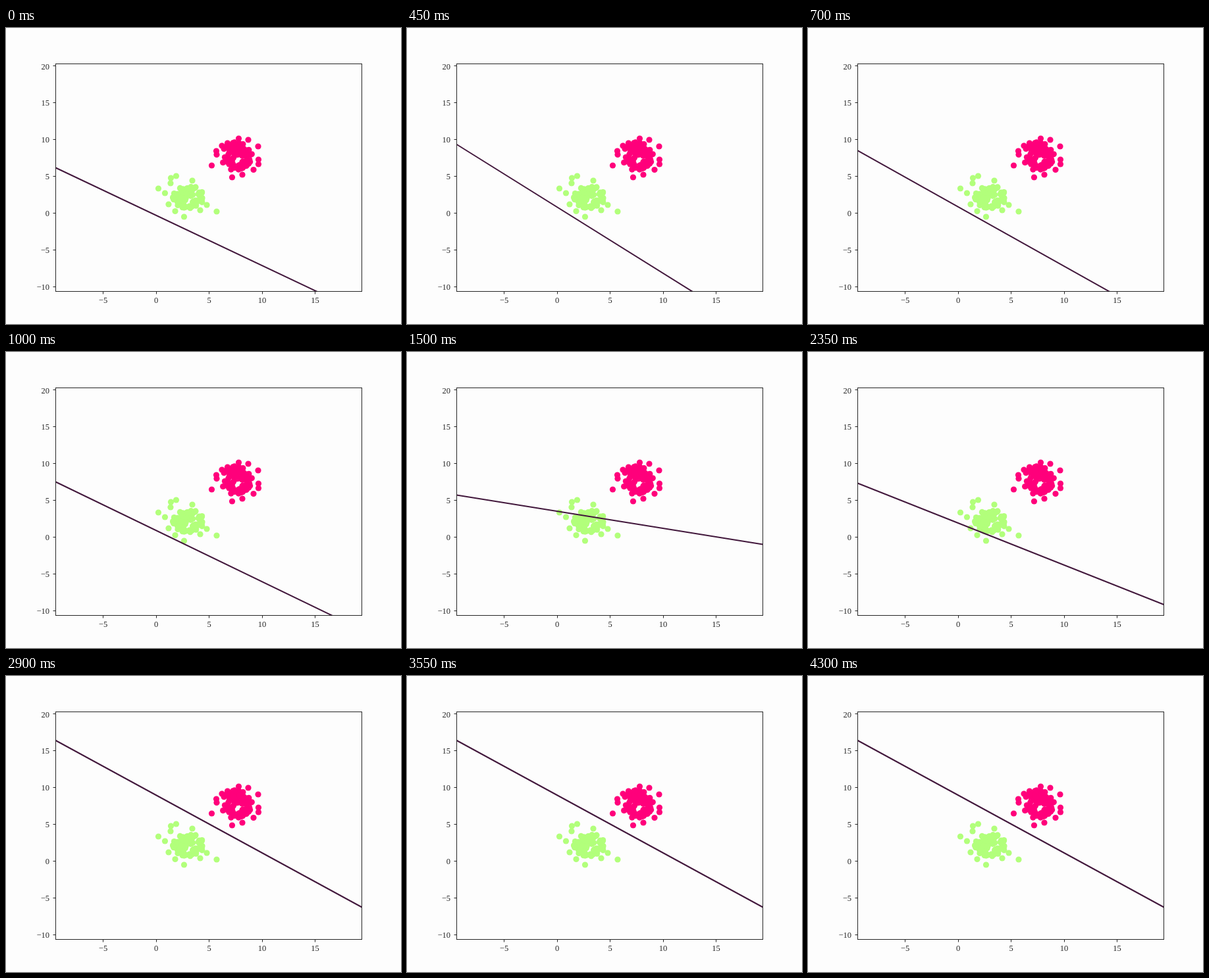
Recreate the animation shown at these times as an HTML page with a canvas. Size 600 by 450 pixels, loop 4.35 s.

```html
<!DOCTYPE html>
<html lang="en">
<head>
<meta charset="utf-8">
<title>Linear separator</title>
<style>
  html, body { margin: 0; width: 100%; height: 100%; overflow: hidden; background: #fdfdfd; }
  canvas { display: block; }
</style>
</head>
<body>
<canvas id="stage" width="600" height="450"></canvas>
<script>
const ctx = document.getElementById('stage').getContext('2d');
const LOOP = 4350, STEP = 50, SETTLE = 2850;
const box = { left: 75.5, top: 54.5, right: 540.5, bottom: 400.5 };
const INK = '#262626';

const xAt = v => 228 + v * 16.1;
const yAt = v => 281.4 - v * 11.17;

function seeded(seed) {
  return () => (seed = (seed * 16807) % 2147483647) / 2147483647;
}

// A cluster is a dense random core plus the few points that shape its rim
function cluster({ color, seed, x, y, rx, ry, rim }) {
  const rand = seeded(seed);
  const points = [...rim];
  while (points.length < 95) {
    const r = Math.sqrt(rand()), a = rand() * 2 * Math.PI;
    points.push([x + rx * r * Math.cos(a), y + ry * r * Math.sin(a)]);
  }
  return { color, points };
}

const clusters = [
  cluster({
    color: '#ff007b', seed: 4127, x: 351, y: 195, rx: 25, ry: 22,
    rim: [[353.5, 168], [368, 170], [336.5, 175], [328, 179], [383, 180], [319.5, 187],
      [320, 192.5], [383.5, 200], [383.5, 207], [376, 215.5], [312.5, 209], [343.5, 227], [359, 223]]
  }),
  cluster({
    color: '#b2ff7b', seed: 9311, x: 277, y: 257, rx: 24, ry: 17,
    rim: [[231.5, 244], [241.5, 251], [250.5, 228], [258.5, 225], [250, 236], [283, 232],
      [247, 268], [257, 278.5], [270.5, 287], [320, 279], [305, 269], [295, 277]]
  })
];

// Separator: time, then height at the left and right edges
const keys = [
  [0, 212.5, 433], [450, 177, 467.5], [1000, 197.5, 422.5],
  [1500, 217.5, 292.5], [2350, 199.5, 384], [SETTLE, 196, 400]
];
const settled = [98, 351.5];

function edges(t) {
  if (t >= SETTLE) return settled;
  const i = keys.findIndex(k => k[0] > t);
  const [t0, l0, r0] = keys[i - 1], [t1, l1, r1] = keys[i];
  const k = (t - t0) / (t1 - t0);
  return [l0 + (l1 - l0) * k, r0 + (r1 - r0) * k];
}

function dots({ color, points }) {
  ctx.fillStyle = color;
  for (const [x, y] of points) {
    ctx.beginPath();
    ctx.arc(x, y, 4.6, 0, 2 * Math.PI);
    ctx.fill();
  }
}

function segment(x1, y1, x2, y2) {
  ctx.beginPath();
  ctx.moveTo(x1, y1);
  ctx.lineTo(x2, y2);
  ctx.stroke();
}

const label = v => String(v).replace('-', '\u2212');
const crisp = v => Math.floor(v) + 0.5;

function axes() {
  ctx.strokeStyle = ctx.fillStyle = INK;
  ctx.lineWidth = 1;
  ctx.strokeRect(box.left, box.top, box.right - box.left, box.bottom - box.top);
  ctx.font = '12.5px "Liberation Serif", "Noto Serif", serif';
  ctx.textBaseline = 'alphabetic';
  ctx.textAlign = 'center';
  for (let v = -5; v <= 15; v += 5) {
    const x = crisp(xAt(v));
    segment(x, box.bottom, x, box.bottom + 4);
    ctx.fillText(label(v), xAt(v), 418);
  }
  ctx.textAlign = 'right';
  for (let v = -10; v <= 20; v += 5) {
    const y = crisp(yAt(v));
    segment(box.left - 4, y, box.left, y);
    ctx.fillText(label(v), 66, yAt(v) + 4.5);
  }
}

function separator(t) {
  const [a, b] = edges(t);
  ctx.save();
  ctx.beginPath();
  ctx.rect(box.left, box.top, box.right - box.left, box.bottom - box.top);
  ctx.clip();
  ctx.strokeStyle = '#42183c';
  ctx.lineWidth = 2;
  segment(box.left, a, box.right, b);
  ctx.restore();
}

function draw(t) {
  ctx.fillStyle = '#fdfdfd';
  ctx.fillRect(0, 0, 600, 450);
  clusters.forEach(dots);
  separator(t);
  axes();
}

function tick() {
  const t = performance.now() % LOOP;
  draw(Math.floor(t / STEP) * STEP);
  requestAnimationFrame(tick);
}
tick();
</script>
</body>
</html>
```
